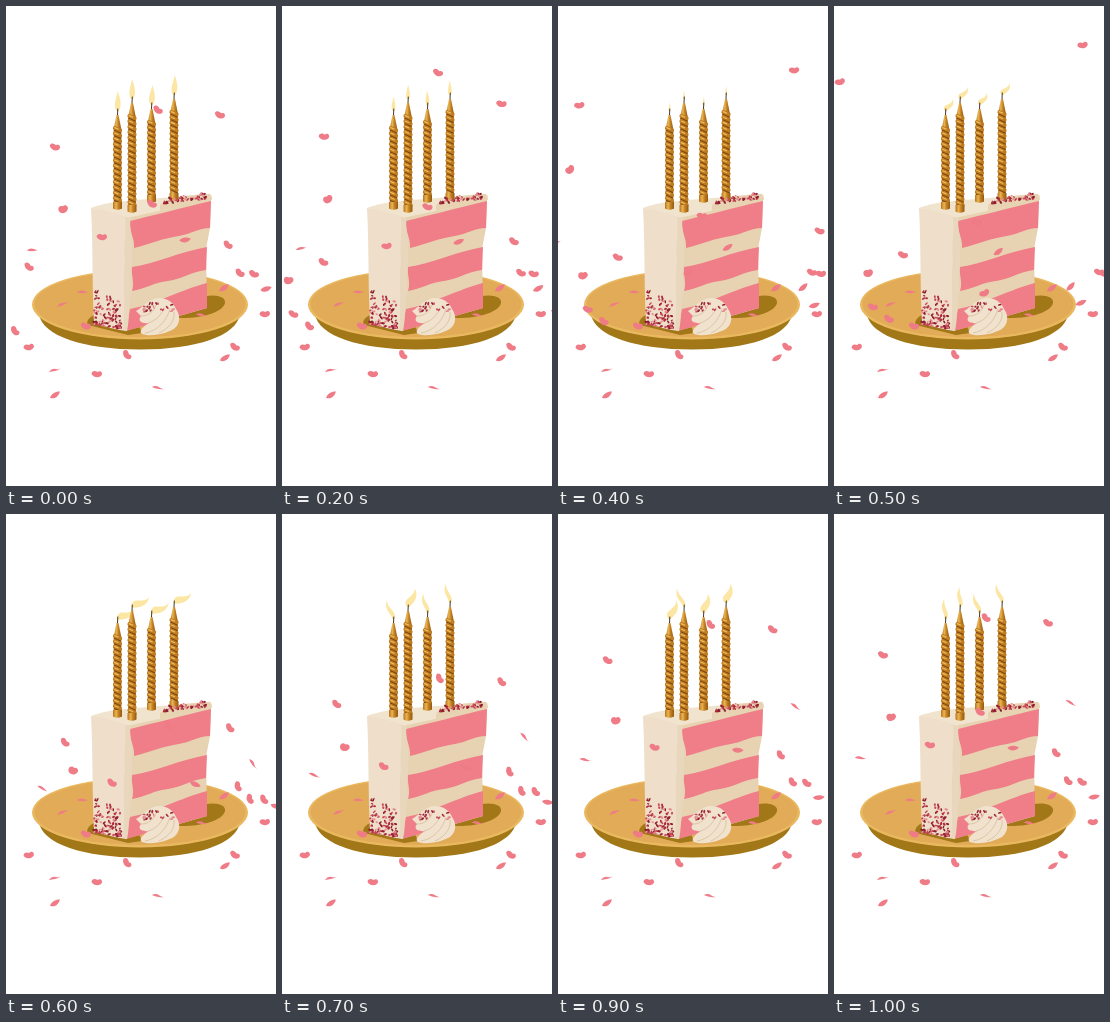
Write an HTML page that moves like this. It is 270 px wide and 480 px high and loops after 1.1 s.

```html
<!DOCTYPE html>
<html lang="en">
<head>
<meta charset="utf-8">
<title>Birthday cake</title>
<style>
  html, body { margin: 0; width: 100%; height: 100%; overflow: hidden; background: #fff; }
  svg { display: block; width: 100vw; height: 100vh; }
  .petal { fill: #ef7b87; }
  .flame { fill: #fbe6a3; }
  .pink { fill: #f07e89; }
  .shade { fill: #a17717; }
</style>
</head>
<body>
<svg viewBox="0 0 270 480">
  <defs>
    <linearGradient id="gold">
      <stop offset="0" stop-color="#b87320"/>
      <stop offset=".35" stop-color="#e9b550"/>
      <stop offset=".6" stop-color="#c58327"/>
      <stop offset="1" stop-color="#94590f"/>
    </linearGradient>
  </defs>

  <g id="plate">
    <path class="shade" d="M33 308C36 330 78 343.500 134 343.500S231 330 234 308Z"/>
    <ellipse cx="134" cy="298.500" rx="108" ry="35" fill="#e9b85f"/>
    <ellipse cx="134" cy="298" rx="105.500" ry="33" fill="#e1ab58"/>
    <path class="shade" d="M200 290C211 288 220 291 219 297C217 306 196 313 170 312L165 303Z"/>
    <path class="shade" d="M88 309C82 312 80 316 82 319L122 329L136 327L132 318Z"/>
  </g>

  <g id="cake">
    <path fill="#e7d3b1" d="M119 212L205 191L204 222L200 243L201 302L166 312L119 325Z"/>
    <path class="pink" d="M124 215C148 209 176 202 205 195L204 222C193 222 185 228 173 230C158 232 144 238 128 242C129 232 123 226 124 215Z"/>
    <path class="pink" d="M126 261C148 258 176 245 201 241L200 264C185 266 176 273 162 275C149 276 139 283 126 285C129 276 125 270 126 261Z"/>
    <path class="pink" d="M124 303C147 299 177 283 201 277V302L166 312L120 325Z"/>
    <path fill="#f1e4cf" d="M85 202C101 195 132 194 155 192L200 188Q207 187 206 193C178 200 147 206 121 212Z"/>
    <path fill="#efdfca" d="M85 202Q102 204 121 211C119 225 122 247 119 266C121 287 119 307 121 325Q103 323 88 316C86 278 87 239 85 202Z"/>
    <path fill="#e8d7bc" d="M119 211L125 212C122 221 128 232 126 244C127 259 123 271 126 284C122 297 124 313 121 325L117 324C120 299 116 276 119 255C117 240 121 225 119 211Z"/>
    <path fill="#e7d3b1" d="M154 199C163 191 183 189 204 188L206 194C188 199 169 201 154 205Z"/>
  </g>
  <g id="candles"></g>
  <g id="cream">
    <path fill="#f0e2cd" d="M130 305C137 301 142 294 151 292C161 291 168 297 170 303C176 311 173 321 166 324C158 328 145 331 136 328C132 325 138 320 143 317C136 318 131 315 135 310Z"/>
    <path fill="none" stroke="#dcc7a5" d="M142 317C150 315 156 308 158 302M139 327C152 325 161 314 164 303M153 327C164 322 169 314 168 306M135 310C143 310 148 305 150 299"/>
  </g>
  <g id="sprinkles"></g>
  <g id="petals"></g>
</svg>

<script>
const STEP = 100, COUNT = 11;
const GUST = 6; // the step at which the loop's upward burst begins
const get = id => document.getElementById(id);

function add(parent, tag, attrs) {
  const node = document.createElementNS('http://www.w3.org/2000/svg', tag);
  for (const key in attrs) node.setAttribute(key, attrs[key]);
  return parent.appendChild(node);
}

// Candles: centre, tip, foot and the step at which the flame leans furthest right
const flames = [];

function candle(x, top, foot, peak) {
  const g = get('candles');
  const stroke = (d, color, width) =>
    add(g, 'path', { d, fill: 'none', stroke: color, 'stroke-width': width, 'stroke-linecap': 'round' });
  const flame = add(g, 'path', { class: 'flame' });
  stroke(`M${x} ${top}l.3 -6`, '#33230f', .9);
  add(g, 'path', { d: `M${x - 1} ${top}h2L${x + 3.8} ${top + 14}V${foot}h-7.6V${top + 14}Z`, fill: 'url(#gold)' });
  for (let y = top + 14; y < foot - 8; y += 5.4) {
    stroke(`M${x - 2.6} ${y - 1}l5.200 2.400`, '#bf7c20', 4);
    stroke(`M${x - 3} ${y + 1.4}l6 2.600`, '#83490c', 1.3);
    stroke(`M${x - 2.8} ${y - 1.4}l3.400 1.500`, '#edbc5a', 1.2);
  }
  add(g, 'path', { d: `M${x - 4.5} ${foot - 7}h9v6.500q-4.500 2.500 -9 0Z`, fill: 'url(#gold)' });
  flames.push({ flame, x, y: top - 4, peak });
}

candle(111.5, 109, 203, 8.9);
candle(126, 97, 206, 7);
candle(145.5, 103, 196, 8.4);
candle(168, 93, 194, 8.4);

function flamePath(len, w, bow) {
  return `M-1 0C${-w * 1.3 - bow} ${-len * .3} ${bow - w * .4} ${-len * .55} 0 ${-len}` +
    `C${bow + w * .8} ${-len * .6} ${w * 1.3 - bow * .3} ${-len * .25} 1 0Z`;
}

// Flames die down, flare up sideways in the gust, then flicker
function drawFlames(step) {
  const fire = step < 4 ? 1 - step / 4 : Math.min(1, (step - 4) / 2);
  const blown = Math.max(0, 1 - Math.abs(step - GUST) / 2) * (step <= GUST);
  const flicker = step > GUST ? 20 : 3;
  for (const { flame, x, y, peak } of flames) {
    const lean = blown ? 60 * blown : flicker * Math.cos((step - peak) * Math.PI / 2);
    const bow = step < 5 ? 0 : 5 * Math.sign(lean);
    flame.setAttribute('d', flamePath(9 + 11 * fire, .8 + 2.8 * fire, bow));
    flame.setAttribute('transform', `translate(${x} ${y}) rotate(${lean})`);
  }
}

// Sprinkles
let seed = 17;
const rnd = () => (seed = seed * 16807 % 2147483647) / 2147483647;
const reds = ['#8c1f2e', '#a92b3b', '#c84b5b', '#e58a92'];

function scatter(count, place) {
  for (let i = 0; i < count; i++) {
    const [x, y] = place(rnd(), rnd());
    add(get('sprinkles'), 'ellipse', {
      rx: 1 + rnd(), ry: .7 + rnd() * .4, fill: reds[i % 4],
      transform: `translate(${x} ${y}) rotate(${rnd() * 180})`
    });
  }
}
scatter(110, (a, b) => [88 + a * 27, 318 + a * 5 - b * b * (38 - a * 12)]);
scatter(48, (a, b) => [157 + a * 44, 195 - a * 5 + (b - .5) * 6]);
scatter(20, (a, b) => [136 + a * 32, 296 + b * 8 + Math.abs(a - .5) * 5]);

// Petals
const shapes = {
  bean: 'M-6-1C-5-5-1-4 1-2C4-4 7-1 5 2C2 5-4 4-6-1Z',
  heart: 'M0-3C3-6 7-2 5 1C3 5-1 5-3 4C-7 1-5-5 0-3Z',
  leaf: 'M-6 2C-4-2 1-4 6-3C4 2-1 5-6 2Z',
  thin: 'M-7 0Q-3-3 1-1T7 0Q0 2.500-7 0Z'
};
const newPetal = kind => add(get('petals'), 'path', { class: 'petal', d: shapes[kind] });
const put = (node, x, y, turn) =>
  node.setAttribute('transform', `translate(${x} ${y}) rotate(${turn}) scale(.9)`);
const rest = (kind, x, y, turn) => put(newPetal(kind), x, y, turn);

const moving = [];
function move(kind, first, last, place) {
  moving.push({ node: newPetal(kind), first, last, place });
}

// Rises to x, y, hangs there, then is pushed away from the plate (or back to it)
function fly(kind, x, y, push = 50, first = 0, last = 10) {
  const angle = Math.atan2(y - 270, x - 134);
  const tilt = rnd() * 40 - 10;
  move(kind, first, last, now => {
    const low = Math.max(0, 1 - now / 4) ** 2;
    const gone = push * Math.max(0, (now - 5) / 4) ** 2;
    return [
      x + 10 * low + Math.cos(angle) * gone,
      y + .55 * (300 - y) * low + Math.sin(angle) * gone,
      tilt + 6 * (5 - now)
    ];
  });
}

// Comes in from the nearer edge of the stage and settles at x, y
function settle(kind, x, y) {
  const side = Math.sign(x - 134);
  const tilt = rnd() * 30 - 10;
  move(kind, 5, COUNT, now => {
    const left = Math.max(0, (10 - now) / 5);
    return [x + side * 46 * left, y + 12 * left, tilt + 20 * left];
  });
}

rest('thin', 57, 298, -25);
rest('thin', 77, 286, -3);
rest('bean', 80, 320, 5);
rest('bean', 91, 368, -10);
rest('leaf', 49, 389, -10);
rest('thin', 49, 364, -15);
rest('bean', 23, 341, -20);
rest('bean', 121, 349, 40);
rest('thin', 152, 382, 8);
rest('leaf', 219, 352, -8);
rest('bean', 229, 341, 20);
rest('leaf', 218, 282, -12);
rest('thin', 196, 309, 5);
rest('bean', 259, 308, -15);

fly('bean', 214, 109);
fly('bean', 49, 141);
fly('heart', 57, 203, 60);
fly('thin', 27, 244, 30);
fly('bean', 152, 104, 150);
fly('bean', 222, 239, 42);
fly('bean', 234, 267, 20);
fly('bean', 248, 268, 15);
fly('leaf', 260, 283, -15);
fly('bean', 96, 231, -50);
fly('leaf', 179, 234, -12);
fly('bean', 146, 198, -12, 4);
fly('thin', 237, 189, 0, 0, 4);

settle('bean', 39, 301);
settle('bean', 55, 313);
settle('heart', 34, 267);
settle('bean', 69, 249);
settle('leaf', 247, 297);

function drawPetals(step) {
  const now = (step - GUST + COUNT) % COUNT;
  for (const { node, first, last, place } of moving) {
    node.style.display = now >= first && now <= last ? '' : 'none';
    put(node, ...place(now));
  }
}

function tick() {
  const step = Math.floor(performance.now() / STEP) % COUNT;
  drawFlames(step);
  drawPetals(step);
  requestAnimationFrame(tick);
}
tick();
</script>
</body>
</html>
```
